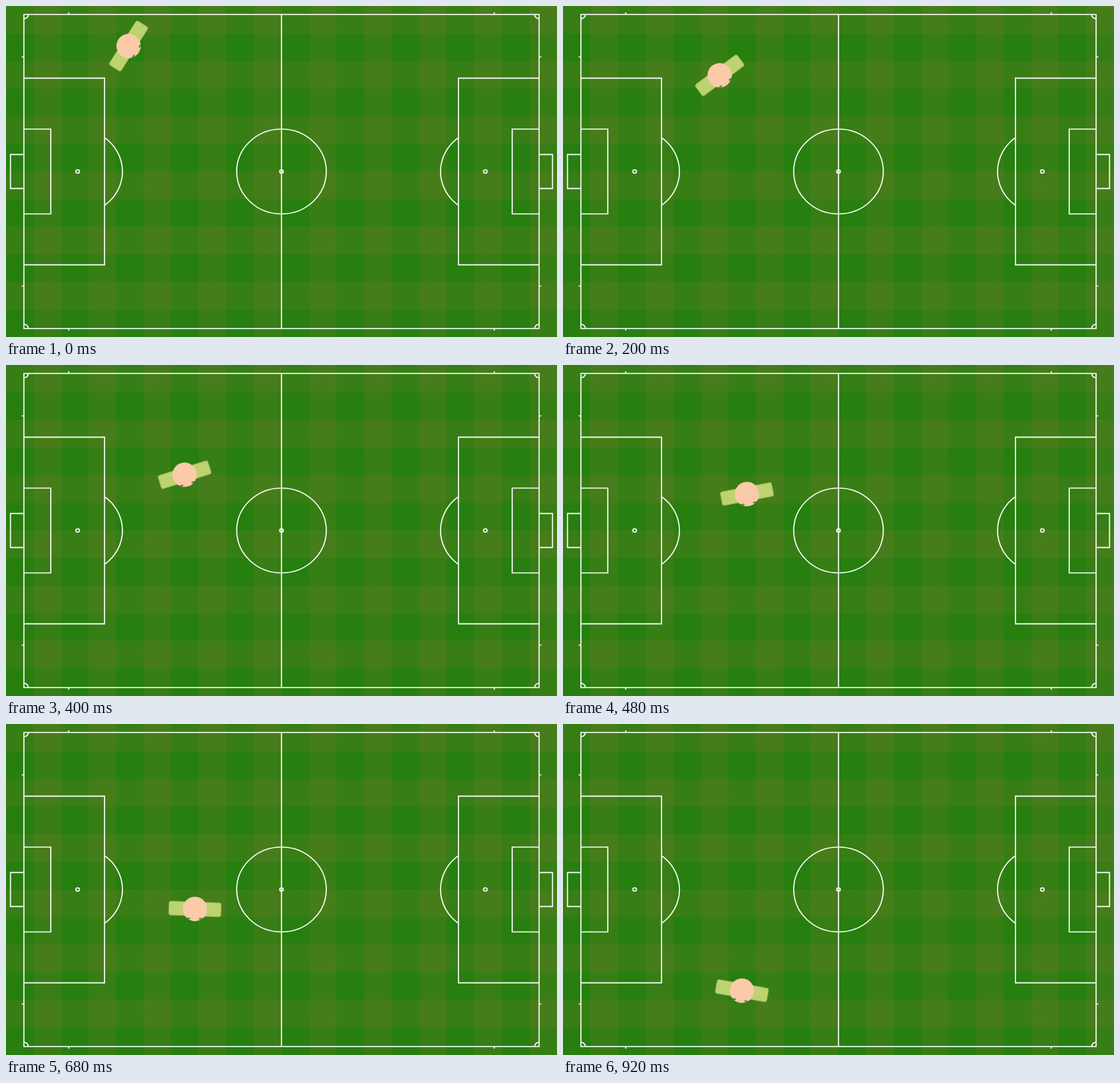
These frames come from a looping animation (800x480 px, 960 ms). An HTML page:

```html
<!DOCTYPE html>
<html lang="en">
<head>
<meta charset="utf-8">
<title>Player running on a pitch</title>
<style>
  html, body { margin: 0; width: 100%; height: 100%; overflow: hidden; }
  body {
    --stripe: rgba(155, 120, 55, .15);
    background:
      linear-gradient(90deg, transparent 50%, var(--stripe) 50%) 0 0 / 80px 80px,
      linear-gradient(var(--stripe) 50%, transparent 50%) 0 0 / 80px 80px,
      #267f0f;
  }
  svg { position: absolute; left: 0; top: 0; width: 800px; height: 480px; }
  .lines { fill: none; stroke: #fff; stroke-width: .25; }
  .shirt { fill: #bcd36f; stroke: #86ab4f; stroke-width: .8; }
  .head { fill: #facaa9; }
  .eye { fill: #4f7b48; }
</style>
</head>
<body>
<!-- Pitch in yards: 115 by 74 -->
<svg class="lines" viewBox="-4 -2 123 78" preserveAspectRatio="none">
  <defs>
    <g id="corner">
      <path d="M1 0A1 1 0 0 1 0 1M10 0V-.5M0 10H-.5"/>
    </g>
    <g id="half">
      <path d="M0 15H18V59H0M0 27H6V47H0M0 33H-3V41H0M18 29A10 10 0 0 1 18 45"/>
      <circle cx="12" cy="37" r=".4"/>
      <use href="#corner"/>
      <use href="#corner" transform="matrix(1 0 0 -1 0 74)"/>
    </g>
  </defs>
  <rect width="115" height="74"/>
  <path d="M57.5 0V74"/>
  <circle cx="57.5" cy="37" r="10"/>
  <circle cx="57.5" cy="37" r=".4"/>
  <use href="#half"/>
  <use href="#half" transform="matrix(-1 0 0 1 115 0)"/>
</svg>
<svg viewBox="0 0 800 480">
  <g id="player">
    <rect class="shirt" x="-38" y="-10.2" width="76" height="20.4" rx="3"/>
    <circle class="head" r="17.7"/>
    <ellipse class="eye" cx="-9" cy="14" rx="3" ry="1.2"/>
    <ellipse class="eye" cx="9" cy="14" rx="3" ry="1.2"/>
  </g>
</svg>
<script>
  const STEP = 40, COUNT = 24;
  const player = document.getElementById('player');

  // Parabolic run, one point per step
  const pos = n => [178 + 11.65 * n - 0.352 * n * n, 58 + 6.9 * n + 0.3215 * n * n];

  // The body faces the next point; the last steps keep their heading
  function heading(n) {
    const m = Math.min(n, 21.3);
    const [x0, y0] = pos(m), [x1, y1] = pos(m + 1);
    return Math.atan2(y1 - y0, x1 - x0) * 180 / Math.PI - 90;
  }

  function draw() {
    const n = Math.floor(performance.now() / STEP) % COUNT;
    const [x, y] = pos(n);
    player.setAttribute('transform', `translate(${x} ${y}) rotate(${heading(n)})`);
    requestAnimationFrame(draw);
  }
  draw();
</script>
</body>
</html>
```
